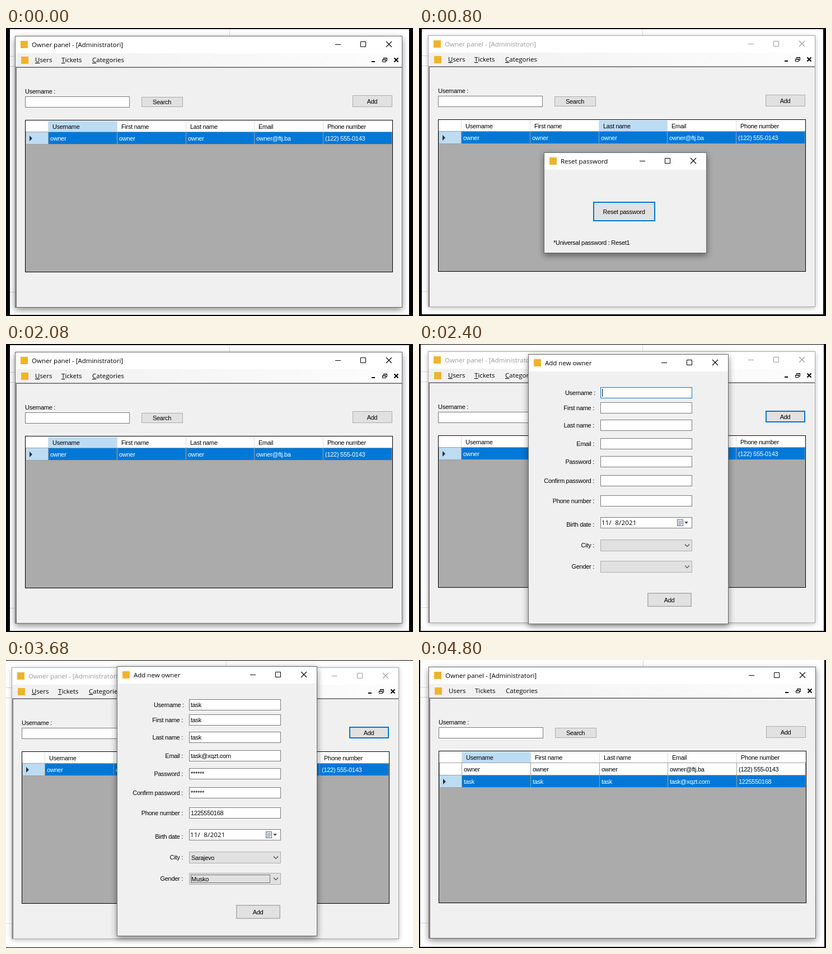
Animation of 727x514 px, one loop 5600 ms. Source, as an HTML page:

```html
<!DOCTYPE html>
<html lang="en">
<head>
<meta charset="utf-8">
<title>Panel walkthrough</title>
<style>
  html, body { margin: 0; width: 100%; height: 100%; overflow: hidden; background: #000; }
  svg { display: block; width: 727px; height: 514px; }
  text { white-space: pre; }
  .ui { font: 11.5px "Open Sans", "Noto Sans", sans-serif; }
  .form { font: 11px "Liberation Sans", Arial, sans-serif; letter-spacing: -.28px; }
</style>
</head>
<body>
<svg id="stage" viewBox="0 0 727 514" xmlns="http://www.w3.org/2000/svg"></svg>
<script>
const STEP = 800;
const BLUE = '#0078d7', PALE = '#bcdcf4', FACE = '#f0f0f0';
const COLS = [76, 199, 322, 444, 567, 690];
const HEADS = ['Username', 'First name', 'Last name', 'Email', 'Phone number'];
const FIRST = ['owner', 'owner', 'owner', 'owner@ftj.ba', '(122) 555-0143'];
const SECOND = ['task', 'task', 'task', 'task@xqzt.com', '1225550168'];
const FIELDS = [
  ['Username :', 77, 'task'], ['First name :', 104, 'task'], ['Last name :', 135, 'task'],
  ['Email :', 168, 'task@xqzt.com'], ['Password :', 200, '******'],
  ['Confirm password :', 234, '******'], ['Phone number :', 270, '1225550168']
];

const rect = (x, y, w, h, fill, extra = '') =>
  `<rect x="${x}" y="${y}" width="${w}" height="${h}" fill="${fill}" ${extra}/>`;
const box = (x, y, w, h, fill, stroke, sw = 1, extra = '') =>
  rect(x + sw / 2, y + sw / 2, w - sw, h - sw, fill, `stroke="${stroke}" stroke-width="${sw}" ${extra}`);
const path = (d, color = '#000', sw = 1, fill = 'none') =>
  `<path d="${d}" fill="${fill}" stroke="${color}" stroke-width="${sw}"/>`;
const text = (cls, x, y, s, fill = '#000', anchor = 'start') =>
  `<text class="${cls}" x="${x}" y="${y}" fill="${fill}" text-anchor="${anchor}">${s}</text>`;
const ui = (...a) => text('ui', ...a);
const form = (...a) => text('form', ...a);
const move = (x, y, body) => `<g transform="translate(${x} ${y})">${body}</g>`;
const cross = (x, y, r, color, sw) =>
  path(`M${x - r} ${y - r}L${x + r} ${y + r}M${x + r} ${y - r}L${x - r} ${y + r}`, color, sw);
const icon = (x, y) => rect(x, y, 13, 13, '#f0b32e');

function button(x, y, w, h, label, focus) {
  return box(x, y, w, h, '#e1e1e1', focus ? BLUE : '#adadad', focus ? 2 : 1) +
    form(x + w / 2 - .5, y + h / 2 + 4, label, '#000', 'middle');
}

function shadow(x, y, w, h, strong) {
  return rect(x, y + (strong ? 4 : 2), w, h, '#000',
    `opacity="${strong ? .45 : .25}" filter="url(#${strong ? 'deep' : 'soft'})"`);
}

function frame(x, y, w, h, title, active) {
  const ink = active ? '#000' : '#999', r = x + w, m = y + 15;
  return shadow(x, y, w, h, active) +
    box(x, y, w, h, FACE, active ? '#6b6b6b' : '#a6a6a6') +
    rect(x + 1, y + 1, w - 2, 30, '#fff') +
    icon(x + 10, y + 9) + ui(x + 30, y + 20, title, ink) +
    path(`M${r - 120} ${m + .5}h10`, ink) +
    path(`M${r - 74.5} ${m - 4.5}h9v9h-9z`, ink) +
    cross(r - 24, m, 5, ink, 1.1);
}

function row(y, cells, selected) {
  let s = rect(35, y, 655, 22, '#a0a0a0') + rect(36, y, 39, 21, selected ? PALE : '#fff');
  if (selected) s += path(`M42 ${y + 6}l5 5l-5 5z`, 'none', 0, '#303030');
  cells.forEach((c, i) => {
    s += rect(COLS[i], y, COLS[i + 1] - COLS[i] - 1, 21, selected ? BLUE : '#fff') +
      form(COLS[i] + 3, y + 15, c, selected ? '#fff' : '#000');
  });
  return s;
}

function grid(hot, extended) {
  let s = box(34, 164, 657, 272, '#ababab', '#000') + rect(35, 165, 655, 21, '#fff');
  HEADS.forEach((h, i) => {
    const x = COLS[i];
    if (i === hot) s += rect(x, 166, COLS[i + 1] - x - 1, 19, PALE);
    s += rect(x - 1, 166, 1, 19, '#dcdcdc') + form(x + 7, 180, h);
  });
  s += rect(35, 185, 655, 1, '#a0a0a0') + row(186, FIRST, !extended);
  return s + (extended ? row(208, SECOND, true) : '');
}

function menu(label, x, keys) {
  const shown = keys ? `<tspan text-decoration="underline">${label[0]}</tspan>${label.slice(1)}` : label;
  return ui(x, 61, shown);
}

function mainWindow({ active, hot, focus, extended, keys = true }) {
  return rect(399, 0, 1, 14, '#d9d9df') +
    [50, 68, 471].map(y => rect(0, y, 16, 1, '#d9d9df')).join('') +
    frame(16, 14, 692, 485, 'Owner panel - [Administratori]', active) +
    rect(17, 45, 690, 24, 'url(#strip)') + icon(27, 51) +
    menu('Users', 52, keys) + menu('Tickets', 99, keys) + menu('Categories', 154, keys) +
    rect(653, 59, 6, 2, '#000') +
    path('M674.5 55.5v-2h6v5h-2M672.5 56.5h6v4h-6zM672 57h7M674 54h7') +
    cross(697, 57, 3.5, '#000', 2) +
    rect(17, 69, 690, 1, '#a0a0a0') + rect(17, 69, 1, 429, '#a0a0a0') +
    rect(18, 70, 689, 1, '#696969') + rect(18, 70, 1, 428, '#696969') +
    form(34, 117, 'Username :') + box(34, 122, 187, 20, '#fff', '#7a7a7a') +
    button(242, 123, 74, 18, 'Search') + button(619, 120, 71, 21, 'Add', focus) +
    grid(hot, extended);
}

const resetDialog = () =>
  frame(223, 222, 291, 180, 'Reset password', true) +
  button(311, 310, 111, 35, 'Reset password', true) +
  form(240, 387, '*Universal password : Reset1');

function combo(y, label, value) {
  return form(313, y + 14, label, '#000', 'end') +
    box(324, y, 164, 21, '#e1e1e1', '#adadad') + form(328, y + 15, value) +
    path(`M475 ${y + 8.5}l4 4l4 -4`, '#444', 1.1);
}

function addDialog({ filled, active = true, picking }) {
  let s = frame(195, 18, 358, 482, 'Add new owner', active);
  FIELDS.forEach(([label, y, value], i) => {
    const typing = !filled && i === 0;
    s += form(i ? 313 : 315, y + 14, label, '#000', 'end') +
      box(324, y, 164, 20, '#fff', typing ? BLUE : '#7a7a7a') +
      (filled ? form(327, y + 14, value) : '');
    if (typing) s += rect(327, y + 3, 1, 14, '#000');
  });
  s += form(313, 326, 'Birth date :', '#000', 'end') + box(324, 309, 164, 20, '#fff', '#7a7a7a') +
    `<g style="letter-spacing:.2px">${ui(326, 323, '11/  8/2021')}</g>` +
    box(461, 313, 11, 12, '#eef0f5', '#667') +
    path('M463 316.5h7M463 318.5h7M463 320.5h7M463 322.5h5', '#8a8fa5') +
    path('M474 317h7l-3.5 4z', 'none', 0, '#3b5578') +
    combo(349, 'City :', filled ? 'Sarajevo' : '') +
    combo(387, 'Gender :', filled ? 'Musko' : '');
  if (picking) s += box(327, 390, 142, 15, 'none', '#000', 1, 'stroke-dasharray="1 1"');
  s += button(408, 444, 79, 25, 'Add', !active);
  if (active) s += box(409, 445, 77, 23, 'none', '#c4c4c4');
  return s;
}

const notice = () =>
  shadow(277, 184, 202, 133, true) + box(277, 184, 202, 133, '#fff', '#6b6b6b') +
  rect(278, 274, 200, 42, FACE) + cross(463, 199, 5, '#000', 1.1) +
  ui(289, 249, 'Successfully added new owner') +
  box(389, 284, 73, 21, '#e1e1e1', BLUE, 2) + ui(425.5, 299, 'OK', '#000', 'middle');

// Each scene: page edges [left, top, right, bottom], window shift, window state, dialogs.
const list = { page: [7, 2, 720, 512], at: [0, 0], main: { active: true, hot: 0 } };
const scenes = [
  list,
  { page: [5, 2, 722, 511], at: [0, -1], main: { hot: 2 }, over: resetDialog() },
  list,
  { page: [3, 1, 723, 512], at: [0, -1], main: { focus: true }, over: addDialog({}) },
  { page: [0, 1, 727, 513], at: [-6, -1], main: { focus: true },
    over: move(3, -7, addDialog({ filled: true, picking: true })) },
  { page: [2, 1, 725, 513], at: [2, -1], main: { focus: true },
    over: move(11, -7, addDialog({ filled: true, active: false })) + notice() },
  { page: [2, 0, 724, 512], at: [1, -2], main: { active: true, hot: 0, extended: true, keys: false } }
];

const stage = document.getElementById('stage');
stage.innerHTML = `<defs>
  <linearGradient id="strip"><stop stop-color="${FACE}"/><stop offset="1" stop-color="#fdfdfd"/></linearGradient>
  <filter id="soft" x="-10%" y="-10%" width="120%" height="120%"><feGaussianBlur stdDeviation="4"/></filter>
  <filter id="deep" x="-15%" y="-20%" width="130%" height="140%"><feGaussianBlur stdDeviation="6"/></filter>
</defs>` + scenes.map(({ page: [l, t, r, b], at, main, over = '' }, i) =>
  `<clipPath id="page${i}">${rect(l, t, r - l, b - t, '#fff')}</clipPath>
  <g class="scene" display="none">${rect(0, 0, 727, 514, '#000')}
    <g clip-path="url(#page${i})">${rect(l, t, r - l, b - t, '#fff')}${move(...at, mainWindow(main))}${over}</g>
  </g>`).join('');

const groups = [...stage.querySelectorAll('.scene')];
const start = performance.now();
let shown = -1;
function tick(now) {
  const i = Math.floor(Math.max(0, now - start) / STEP) % groups.length;
  if (i !== shown) {
    groups.forEach((g, k) => g.setAttribute('display', k === i ? 'inline' : 'none'));
    shown = i;
  }
  requestAnimationFrame(tick);
}
tick(start);
</script>
</body>
</html>
```
